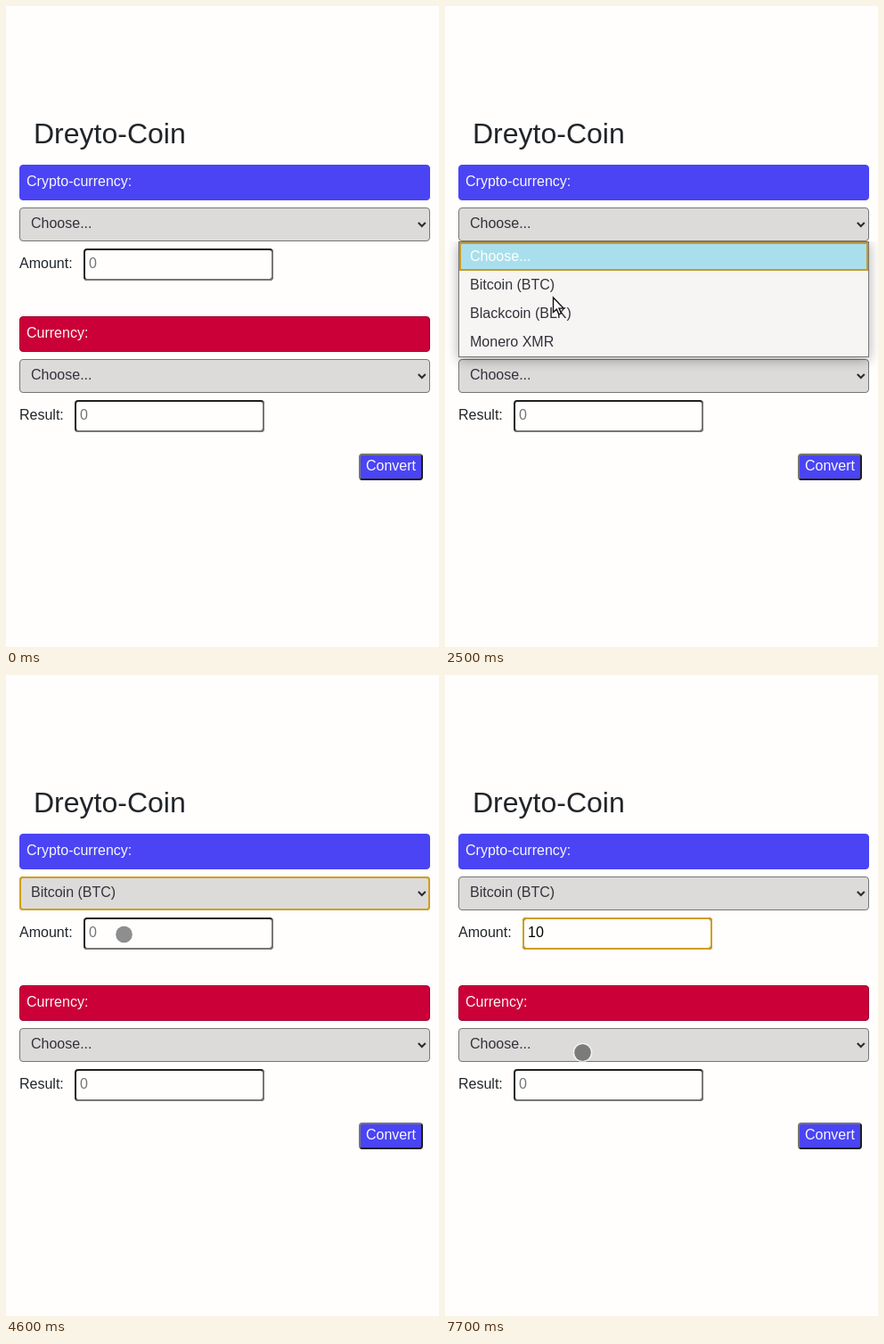
An HTML page for the animation above (8000 ms loop, 486x719 px).

```html
<!DOCTYPE html>
<html lang="en">
<head>
<meta charset="utf-8">
<title>Converter form</title>
<style>
  html, body { margin: 0; width: 100%; height: 100%; overflow: hidden; background: #fffefd; }
  svg { display: block; }
  text { font: 16px "Liberation Sans", Arial, sans-serif; white-space: pre; }
</style>
</head>
<body>
<svg id="stage" width="486" height="719" viewBox="0 0 486 719">
  <defs>
    <clipPath id="below"><rect y="264" width="486" height="200"/></clipPath>
  </defs>
</svg>
<script>
const LOOP = 8000, STEP = 100;
const LEFT = 15, WIDTH = 461, ROW = 32;
const PAPER = '#fffefd', BLUE = '#4a44f4', RED = '#cc0038', GOLD = '#d09e1c', GREY = '#767676';
const INK = '#212529', DARK = '#1f1f1f', OPTION = '#33323a', LIGHT = '#f8f9fa', HINT = '#757575';
const OPTIONS = ['Choose...', 'Bitcoin (BTC)', 'Blackcoin (BLK)', 'Monero XMR'];
const stage = document.getElementById('stage');

function add(tag, attrs, parent = stage) {
  const el = document.createElementNS('http://www.w3.org/2000/svg', tag);
  for (const key in attrs) el.setAttribute(key, attrs[key]);
  return parent.appendChild(el);
}

function label(x, y, content, fill = INK, parent = stage) {
  const el = add('text', { x, y, fill }, parent);
  el.textContent = content;
  return el;
}

// Rectangle given by its outer edge, with the border drawn inside it.
function box(x, y, width, height, fill, stroke, line = 1, radius = 4, parent = stage) {
  const h = line / 2;
  return add('rect', {
    x: x + h, y: y + h, width: width - line, height: height - line,
    rx: Math.max(0, radius - h), fill, stroke, 'stroke-width': line
  }, parent);
}

// Box with a two-tone border, split at the bottom left and top right corners.
function bevel(x, y, w, h, fill, topLeft, bottomRight) {
  const r = x + w, b = y + h, arc = 'A3 3 0 0 0 ';
  box(x, y, w, h, fill, topLeft, 2);
  add('path', {
    d: `M${x + 1.9} ${b - 1.9}${arc}${x + 4} ${b - 1}H${r - 4}${arc}${r - 1} ${b - 4}V${y + 4}${arc}${r - 1.9} ${y + 1.9}`,
    fill: 'none', stroke: bottomRight, 'stroke-width': 2
  });
}

// Coloured heading, select and input; returns the two texts that can change.
function section(y, heading, fill, edge, caption, inputX) {
  box(LEFT, y, WIDTH, 40, fill, edge);
  label(LEFT + 8, y + 24, heading, LIGHT);
  box(LEFT, y + 48, WIDTH, 38, '#dcdbda', GREY);
  add('path', { d: `M462.8 ${y + 65}l4 4 4-4`, fill: 'none', stroke: '#2b2b33', 'stroke-width': 2 });
  const choice = label(LEFT + 13, y + 71, OPTIONS[0], OPTION);
  label(LEFT, y + 116, caption);
  bevel(inputX, y + 94, 213, 36, PAPER, DARK, GREY);
  return { choice, value: label(inputX + 6, y + 116, '0', HINT) };
}

function show(el, visible) {
  el.setAttribute('visibility', visible ? 'visible' : 'hidden');
}

label(31, 154, 'Dreyto-Coin').style.fontSize = '32px';
const from = section(178, 'Crypto-currency:', BLUE, BLUE, 'Amount:', 87);
section(348, 'Currency:', RED, '#9c0530', 'Result:', 77);
bevel(396, 502, 72, 30, BLUE, GREY, DARK);
label(404, 521, 'Convert', LIGHT);

const caret = add('rect', { y: 281, width: 1, height: 17 });
const selectFocus = box(LEFT, 226, WIDTH, 38, 'none', GOLD, 2);
const amountFocus = box(87, 272, 213, 36, 'none', GOLD, 2);

const popup = add('g', {});
const shade = add('g', { 'clip-path': 'url(#below)' }, popup);
add('rect', { x: LEFT, y: 266, width: WIDTH, height: 131, opacity: .32, style: 'filter:blur(7px)' }, shade);
box(LEFT, 264, WIDTH, 130, '#f7f5f4', GREY, 1, 0, popup);
const highlight = box(LEFT + 1, 265, WIDTH - 2, ROW, '#a9dfec', '#c99a25', 2, 0, popup);
const items = OPTIONS.map((name, i) => label(LEFT + 13, 286 + ROW * i, name, OPTION, popup));

const dot = add('g', {});
add('circle', { r: 9.5, opacity: .44 }, dot);
add('circle', { r: 10.1, fill: 'none', stroke: '#fff', 'stroke-width': 1.4, opacity: .65 }, dot);
const arrow = add('path', {
  d: 'M.5.5V17L4.3 13.7 6.8 19.4 9.5 18.2 7 12.6H12Z',
  fill: '#fff', stroke: '#111', 'stroke-width': 1.4
});

// The pointer rests between these moves.
const entry = { x: 31, y: 239 };
const moves = [
  { start: 900, end: 1100, x: 108, y: 249 },
  { start: 1700, end: 2500, x: 121, y: 326.5 },
  { start: 2600, end: 3200, x: 102, y: 311 },
  { start: 4000, end: 4200, x: 128, y: 296 },
  { start: 4500, end: 4600, x: 132.5, y: 291 },
  { start: 5700, end: 6400, x: 163.5, y: 333 },
  { start: 6400, end: 6700, x: 166, y: 374 },
  { start: 7000, end: 7600, x: 154.5, y: 423.5 }
];

const ease = k => k * k * (3 - 2 * k);

function pointerAt(t) {
  return moves.reduce((p, move) => {
    const k = ease(Math.min(1, Math.max(0, (t - move.start) / (move.end - move.start))));
    return { x: p.x + (move.x - p.x) * k, y: p.y + (move.y - p.y) * k };
  }, entry);
}

// Moments at which the form changes.
const ENTER = 900, PRESS = 1300, OPEN = 1400, ARROW = 1800, HOVER = 3500, PICK = 3700, EDIT = 5700;
const BLINK = 500, TYPED = 5900;

function draw(time) {
  const t = Math.floor((time % LOOP) / STEP) * STEP;
  const open = t >= OPEN && t < PICK;
  const onMenu = t >= ARROW && t < PICK;
  const editing = t >= EDIT;
  const chosen = t >= HOVER ? 1 : 0;
  const typed = '10'.slice(0, Math.max(0, (t - EDIT) / STEP));

  from.choice.textContent = OPTIONS[t >= PICK ? 1 : 0];
  from.value.textContent = typed || '0';
  from.value.setAttribute('fill', typed ? '#000' : HINT);
  caret.setAttribute('x', Math.round(93 + 8.9 * typed.length));
  show(caret, editing && (t < TYPED || Math.floor((t - TYPED) / BLINK) % 2 === 0));
  show(selectFocus, t >= PRESS && !open && !editing);
  show(amountFocus, editing);

  show(popup, open);
  highlight.setAttribute('y', 266 + ROW * chosen);
  items.forEach((item, i) => item.setAttribute('fill', i === chosen ? '#fff' : OPTION));

  const { x, y } = pointerAt(t);
  for (const el of [dot, arrow]) el.setAttribute('transform', `translate(${x} ${y})`);
  show(dot, t >= ENTER && !onMenu);
  show(arrow, onMenu);
}

const start = performance.now();
function tick() {
  draw(performance.now() - start);
  requestAnimationFrame(tick);
}
tick();
</script>
</body>
</html>
```
